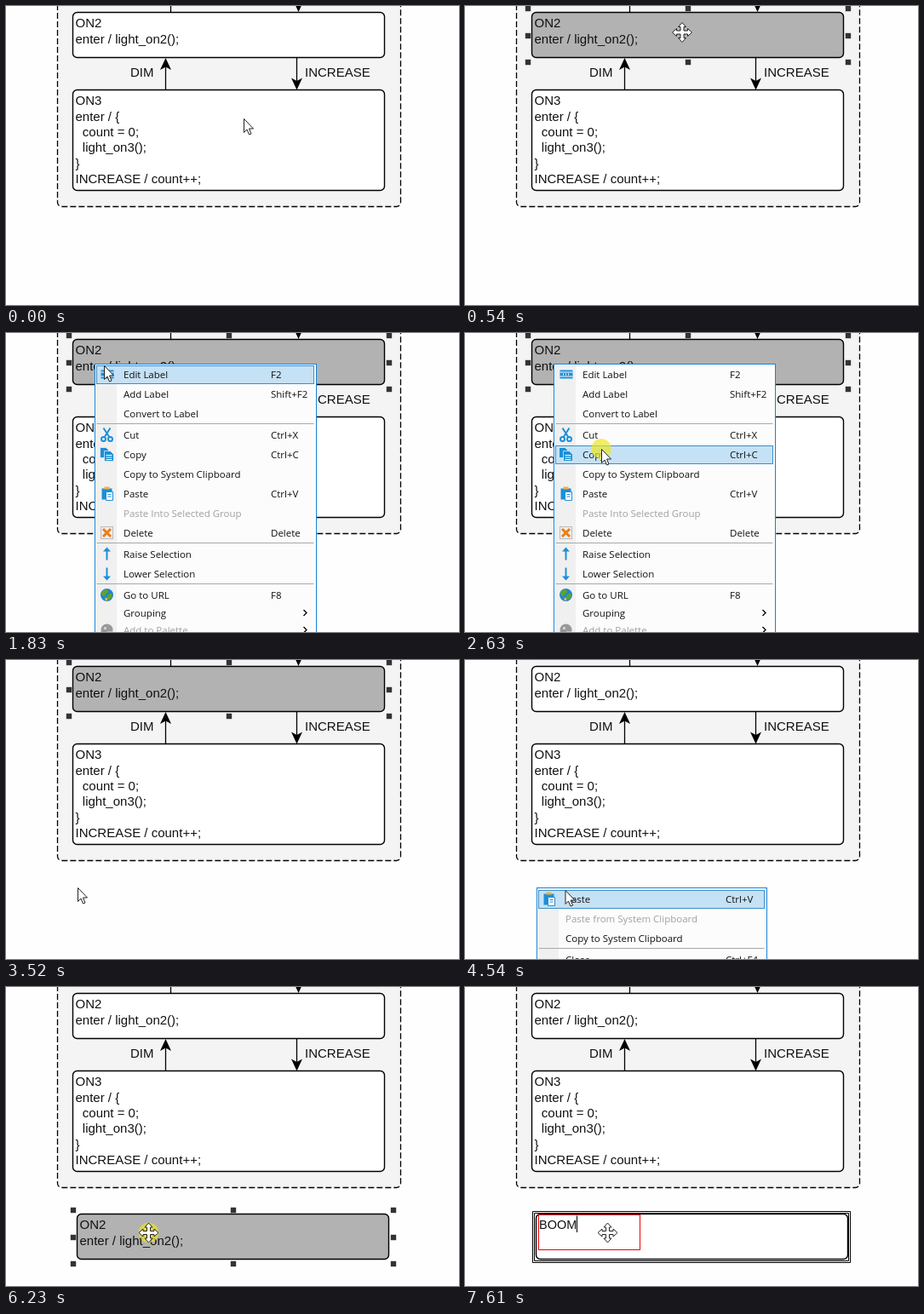
Write an HTML page that moves like this. It is 532 px wide and 351 px high and loops after 8000 ms.

```html
<!DOCTYPE html>
<html lang="en">
<head>
<meta charset="utf-8">
<title>Copying a state</title>
<style>
  html, body { margin: 0; width: 100%; height: 100%; overflow: hidden; background: #fefefe; }
  svg { display: block; width: 532px; height: 351px; }
  text { white-space: pre; }
  .diagram text { font: 15px "Liberation Sans", Arial, sans-serif; fill: #111; }
  .diagram .editor text { font-size: 14.5px; }
  .menu text { font: 11.5px "Open Sans", "Noto Sans", sans-serif; fill: #111; }
  .menu .off { fill: #a0a0a0; }
  .line { fill: none; stroke: #000; stroke-width: 1.3; }
  .box { fill: #fff; stroke: #000; stroke-width: 1.4; }
  .selected .box { fill: #b2b2b2; }
  .handles { display: none; fill: #333; }
  .selected .handles { display: inline; }
  .pointer { fill: #fff; stroke: #222; stroke-width: 1; stroke-linejoin: round; }
</style>
</head>
<body>
<svg id="stage" viewBox="0 0 532 351"></svg>
<script>
const LOOP = 8000;
const BLUE = '#1c8fd6';

const lines = (x, y, list) =>
  list.map((s, i) => `<text x="${x}" y="${y + i * 18.4}">${s}</text>`).join('');

function node(id, x, y, h, list) {
  let handles = '';
  for (const hx of [-4.5, 183.5, 371.5])
    for (const hy of [-4.5, 27.5, 58.5])
      if (hx !== 183.5 || hy !== 27.5)
        handles += `<rect x="${x + hx - 3.2}" y="${y + hy - 3.2}" width="6.4" height="6.4"/>`;
  return `<g id="${id}"><rect class="box" x="${x}" y="${y}" width="366" height="${h}" rx="5"/>
    <g class="label">${lines(x + 3, y + 17.6, list)}</g><g class="handles">${handles}</g></g>`;
}

const head = (x, y, turn) =>
  `<path d="M0 0L6.5 14L0 10.5L-6.5 14Z" transform="translate(${x} ${y}) rotate(${turn})"/>`;

// Each icon is drawn around its own centre.
const icons = {
  label: `<path fill="${BLUE}" d="M-7-5H8V5H-7Z"/><path stroke="#fff" d="M-7-2.500H8M-7 2.500H8M-3-1V1M0-1V1M3-1V1"/>`,
  cut: `<g fill="none" stroke="${BLUE}" stroke-width="2"><path d="M-4-8L3 3M4-8L-3 3"/><circle cx="-4" cy="5" r="2.500"/><circle cx="4" cy="5" r="2.500"/></g>`,
  copy: `<g fill="${BLUE}" stroke="#eef6fb" stroke-width=".7"><path d="M-8-8H-1L2-5V4H-8Z"/><path d="M-3-4H4L8 0V8H-3Z"/></g><path stroke="#fff" d="M-1 1H6M-1 3.500H6M-1 6H6"/>`,
  paste: `<path fill="${BLUE}" d="M-6-6H6V7H-6Z"/><path fill="#f0b040" d="M-3-8H3V-5H-3Z"/><path fill="#fff" stroke="${BLUE}" d="M-1-2H7V8H-1Z"/><path stroke="${BLUE}" d="M1 1H5M1 3.500H5"/>`,
  remove: '<rect x="-7" y="-7" width="14" height="14" fill="#eee" stroke="#bbb"/><path stroke="#f07c10" stroke-width="3" d="M-4.500-4.500L4.500 4.500M4.500-4.500L-4.500 4.500"/>',
  up: `<path fill="${BLUE}" d="M0-8L4.500-3H1V7H-1V-3H-4.500Z"/>`,
  down: `<path fill="${BLUE}" d="M0 8L4.500 3H1V-7H-1V3H-4.500Z"/>`,
  globe: '<circle r="7.500" fill="#2384cf"/><path fill="#5aa52e" d="M-6-4L-1-7L2-4L-1-1L-3 2L-6 0ZM2-1L6-2L6 3L2 6L0 2Z"/><path fill="#e6c24a" d="M-2 3L1 4L0 7L-2 6Z"/>',
  palette: '<circle r="7" fill="#999"/><path fill="#f0f0f0" d="M0 2H7V8H2Z"/><circle cx="-2" cy="-2" r="1.500" fill="#ddd"/>'
};

// A row is [centre, text, shortcut, icon, disabled]; a lone number is a separator.
function menu(id, x, y, w, keyX, rows) {
  const body = rows.map(row => {
    if (typeof row === 'number')
      return `<path stroke="#a8a8a8" d="M${x + 2} ${row + .5}H${x + w - 3}"/>`;
    const [c, label, key, icon, off] = row;
    const shade = off ? ' class="off"' : '';
    const extra = key === '>'
      ? `<path class="line" stroke-width="1" d="M${x + 245} ${c - 3}l3.500 3.500l-3.500 3.500"/>`
      : `<text x="${keyX}" y="${c + 4.8}"${shade}>${key}</text>`;
    const mark = icon ? `<g transform="translate(${x + 14} ${c + .5})">${icons[icon]}</g>` : '';
    return `${mark}<text x="${x + 33.5}" y="${c + 4.8}"${shade}>${label}</text>${extra}`;
  }).join('');
  return `<g id="${id}" class="menu">
    <rect x="${x}" y="${y}" width="${w}" height="400" fill="#fcfcfc" stroke="#1883d7"/>
    <rect x="${x + 1.5}" y="${y + 1.5}" width="24" height="397" fill="#f0f0f0"/>
    <rect class="hot" x="${x + 2}" width="${w - 5}" height="21" fill="#c5e1f5" stroke="#3c8fc8"/>${body}</g>`;
}

const nodeMenu = [
  [48, 'Edit Label', 'F2', 'label'], [71, 'Add Label', 'Shift+F2'], [94, 'Convert to Label', ''], 106,
  [119, 'Cut', 'Ctrl+X', 'cut'], [142, 'Copy', 'Ctrl+C', 'copy'], [165, 'Copy to System Clipboard', ''],
  [188, 'Paste', 'Ctrl+V', 'paste'], [211, 'Paste Into Selected Group', '', '', true],
  [234, 'Delete', 'Delete', 'remove'], 246,
  [259, 'Raise Selection', '', 'up'], [282, 'Lower Selection', '', 'down'], 294,
  [307, 'Go to URL', 'F8', 'globe'], [328, 'Grouping', '&gt;'.replace('&gt;', '>')],
  [348, 'Add to Palette', '>', 'palette', true]
];
const canvasMenu = [
  [280, 'Paste', 'Ctrl+V', 'paste'], [303, 'Paste from System Clipboard', '', '', true],
  [326, 'Copy to System Clipboard', ''], 338, [351, 'Close', 'Ctrl+F4']
];

const stateText = ['ON2', 'enter / light_on2();'];
const quarter = 'M0-11.500L4.500-6.500H2V-2H6.500V-4.500L11.500 0L6.500 4.500V2H2V6.500H4.500L0 11.500' +
  'L-4.500 6.500H-2V2H-6.500V4.500L-11.500 0L-6.500-4.500V-2H-2V-6.500H-4.500Z';

stage.innerHTML = `
<g class="diagram">
  <rect x="60.500" y="-20" width="403" height="255.500" rx="5" fill="#f4f4f4" stroke="#000" stroke-width="1.300" stroke-dasharray="7 3"/>
  <path class="line" d="M193.500 0V7M343.500 0V2M187.500 98V70M341.500 61V90"/>
  ${node('first', 78.5, 7.5, 53, stateText)}
  ${node('third', 78.5, 98.5, 118, ['ON3', 'enter / {', '  count = 0;', '  light_on3();', '}', 'INCREASE / count++;'])}
  ${head(187.5, 61, 0)}${head(341.5, 98.5, 180)}${head(343.5, 7, 180)}
  <text x="146" y="83">DIM</text><text x="351" y="83">INCREASE</text>
  ${node('copy', 83.5, 266.5, 53, stateText)}
  <g id="editor" class="editor">
    <path class="line" style="stroke-width:1" d="M79.500 263.500H452.500V323.500H79.500ZM81.500 265.500H450.500V321.500H81.500Z"/>
    <rect x="86.500" y="267.500" width="119" height="41" fill="#fff" stroke="#f00000"/>
    <text id="line1" x="87" y="284"></text><text id="line2" x="87" y="302.500"></text>
    <path id="caret" stroke="#000" d="M0 0V19.500"/>
  </g>
</g>
${menu('menuA', 104.5, 36.5, 260, 311, nodeMenu)}
${menu('menuB', 84.5, 267.5, 270, 306, canvasMenu)}
<g id="cursor">
  <circle id="click" r="11.800" fill="#eee61e" fill-opacity=".68"/>
  <path id="arrow" class="pointer" d="M.500.500V16.500L4 13L6.500 19L9 18L6.500 12H11.500Z"/>
  <path id="cross" class="pointer" d="${quarter}"/>
</g>`;

// Pointer moves: [first step, last step, number of steps, x, y].
const moves = [
  [70, 410, 6, 262, 40], [540, 540, 1, 255, 31], [610, 820, 4, 148, 46], [890, 960, 2, 27, 28],
  [1160, 1480, 5, 104, 36], [1830, 1830, 1, 115, 38], [1900, 2430, 8, 160, 136],
  [2700, 3180, 8, 47, 250], [3250, 3450, 4, 78, 268], [3520, 3520, 1, 84, 267],
  [4470, 4470, 1, 100, 268], [4540, 4540, 1, 117.5, 270], [4610, 4750, 3, 133, 277],
  [5280, 5490, 4, 190, 288], [5690, 5960, 4, 167.5, 288.5]
];
const clicks = [[410, 540], [1500, 1830], [2500, 2700], [3720, 3790], [4950, 5020], [6230, 6300]];
const dragShape = [[480, 960], [1230, 1570], [5020, LOOP]];

const within = (t, spans) => spans.some(([a, b]) => t >= a && t < b);
const show = (el, on) => { el.style.display = on ? '' : 'none'; };

function pointerAt(t) {
  let x = 279, y = 132;
  for (const [start, end, n, toX, toY] of moves) {
    if (t < start) break;
    const step = n === 1 ? 1 : Math.min(n, Math.floor((t - start) / (end - start) * (n - 1) + 1.001));
    x += (toX - x) * step / n;
    y += (toY - y) * step / n;
  }
  return [x, y];
}

function drawMenu(el, rows, open, hot, y) {
  show(el, open);
  const bar = el.querySelector('.hot');
  show(bar, hot);
  const centres = rows.filter(Array.isArray).map(row => row[0]);
  const nearest = centres.reduce((a, b) => Math.abs(b - y) < Math.abs(a - y) ? b : a);
  bar.setAttribute('y', nearest - 9.5);
}

function drawEditor(t) {
  const typed = t >= 7290;
  line1.textContent = typed ? 'BOOM'.slice(0, Math.floor((t - 7290) / 106) + 1) : stateText[0];
  line2.textContent = typed ? '' : stateText[1];
  const width = (typed ? line1 : line2).getComputedTextLength();
  const x = Math.floor(87 + width) + .5;
  caret.setAttribute('transform', `translate(${x} ${typed ? 268.5 : 288})`);
  show(caret, typed || t < 6830);
}

function draw(t) {
  const [x, y] = pointerAt(t);
  const editing = t >= 6370;
  first.classList.toggle('selected', t >= 480 && t < 3720);
  copy.classList.toggle('selected', !editing);
  show(copy, t >= 5020);
  show(copy.querySelector('.label'), !editing);
  show(editor, editing);
  if (editing) drawEditor(t);
  drawMenu(menuA, nodeMenu, t >= 1570 && t < 2700, t >= 1830, y);
  drawMenu(menuB, canvasMenu, t >= 4120 && t < 5020, t >= 4470, y);
  const dragging = within(t, dragShape);
  show(arrow, !dragging);
  show(cross, dragging);
  show(click, within(t, clicks));
  cursor.setAttribute('transform', `translate(${x} ${y})`);
}

const [stageEl, first, copy, editor, line1, line2, caret, menuA, menuB, cursor, click, arrow, cross] =
  ['stage', 'first', 'copy', 'editor', 'line1', 'line2', 'caret', 'menuA', 'menuB', 'cursor', 'click', 'arrow', 'cross']
    .map(id => document.getElementById(id));

const begin = performance.now();
function tick() {
  draw((performance.now() - begin) % LOOP);
  requestAnimationFrame(tick);
}
tick();
</script>
</body>
</html>
```
